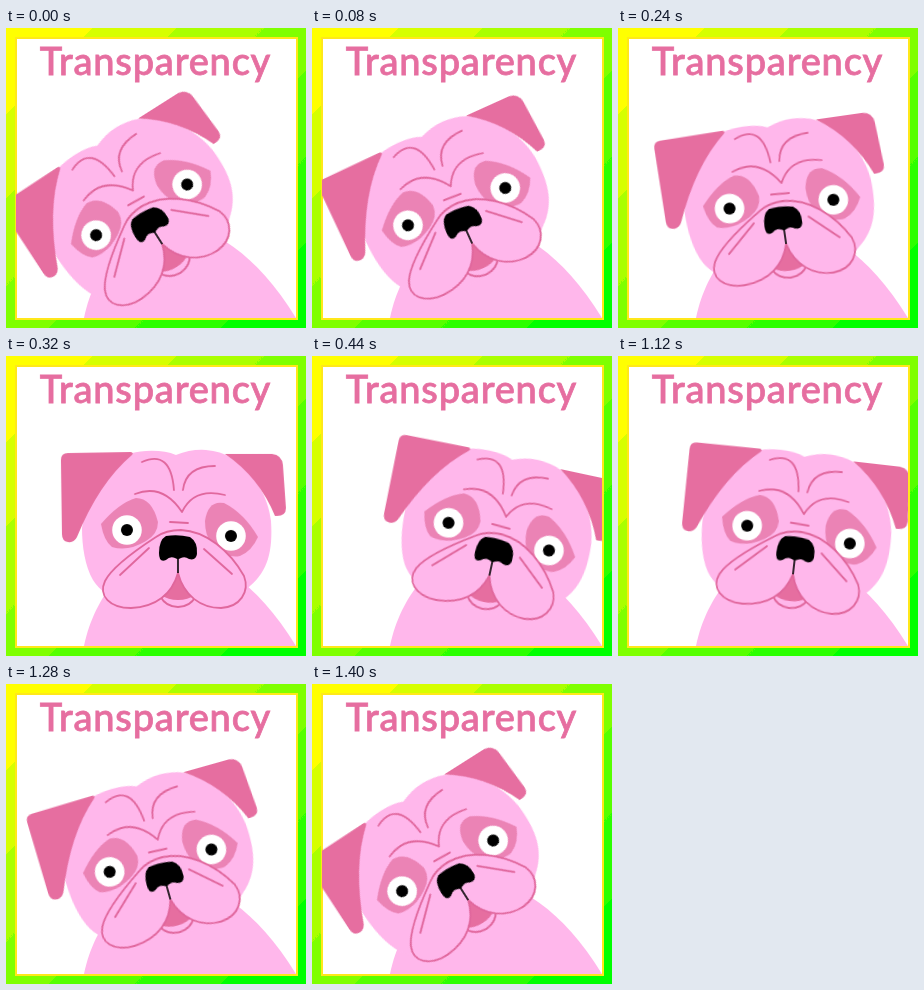
An HTML page that plays this animation: 300x300 px, repeating every 1.92 s.

```html
<!DOCTYPE html>
<html lang="en">
<head>
<meta charset="utf-8">
<title>Transparency</title>
<style>
  html, body { margin: 0; width: 100%; height: 100%; overflow: hidden; }
  svg { display: block; width: 100%; height: 100%; }
  .title { font: 500 38px Lato, sans-serif; letter-spacing: .8px; fill: #e66ea0; stroke: #e66ea0; stroke-width: .8; }
  .skin { fill: #ffb7eb; }
  .dark { fill: #e66ea0; }
  .patch { fill: #eb83b5; }
  .line { stroke: #e0669c; stroke-width: 1.8; stroke-linecap: round; stroke-linejoin: round; }
  .open { fill: none; }
  .head { transform-origin: 162.6px 243.7px; animation: tilt 1920ms infinite; }
  @keyframes tilt {
    0% { transform: rotate(-32.4deg); animation-timing-function: steps(11, end); }
    22.9167%, 56.25% { transform: rotate(12.1deg); animation-timing-function: steps(8, end); }
    72.9167%, 100% { transform: rotate(-32.4deg); }
  }
</style>
</head>
<body>
<svg viewBox="0 0 300 300">
  <defs>
    <linearGradient id="fade" x2="1" y2="1">
      <stop stop-color="#ff0"/>
      <stop offset="1" stop-color="#0f0"/>
    </linearGradient>
    <filter id="bands" x="0" y="0" width="1" height="1" color-interpolation-filters="sRGB">
      <feComponentTransfer>
        <feFuncR type="discrete" tableValues="0 .17 .34 .5 .67 .84 1"/>
      </feComponentTransfer>
    </filter>
    <clipPath id="window"><rect x="10" y="10" width="280" height="280"/></clipPath>
    <g id="eye">
      <circle r="14.8" fill="#fff"/>
      <circle r="6"/>
    </g>
  </defs>

  <rect width="300" height="300" fill="url(#fade)" filter="url(#bands)"/>
  <rect x="10" y="10" width="281" height="281" fill="#fff" stroke="#ffe81a" stroke-width="2"/>
  <text class="title" x="149.5" y="47" text-anchor="middle">Transparency</text>

  <g clip-path="url(#window)">
    <path class="skin" d="M78 290C88 240 125 195 165 195C205 197 250 225 290 290Z"/>

    <g class="head">
      <!-- skull and ears -->
      <path class="skin" d="M108 108Q118 96 140 95Q158 94 170 99Q185 93 200 94Q215 95 225 102C250 120 262 140 265 165C267 195 262 215 244 230C225 250 200 254 172 254C130 254 100 245 87 224C79 210 76 190 76 172C80 145 90 125 108 108Z"/>
      <path class="dark" d="M62 97L125 96Q128 97 126 99Q93 127 71 181Q68 187 62 186Q56 185 56 178L55 104Q55 97 62 97Z"/>
      <path class="dark" d="M219 98L266 98Q276 99 277 109L280 152Q280 161 269 160Q253 121 219 98Z"/>

      <!-- brow wrinkles -->
      <path class="line open" d="M136 106Q165 93 168 134M177 134Q180 110 209 110M129 138Q157 127 176 156Q188 131 219 139M164 166L182 167"/>

      <!-- eyes -->
      <path class="patch" d="M95 168Q113 147 130 142Q146 142 152 166Q152 178 140 185Q122 196 106 191Q98 185 95 168Z"/>
      <path class="patch" d="M252 181Q238 157 218 147Q202 144 199 165Q199 180 206 188Q220 203 234 200Q246 195 252 181Z"/>
      <use href="#eye" x="121" y="174"/>
      <use href="#eye" x="225" y="180"/>

      <!-- mouth and muzzle -->
      <path class="skin line" d="M154 240Q160 251 172 251Q184 251 190 240Z"/>
      <path class="dark" d="M172 214L155 239Q162 244 172 244Q182 244 189 239Z"/>
      <path class="skin line" d="M172 217C166 238 150 251 125 252C104 252 92 240 99 225C106 211 130 194 150 181Q160 174 175 174C200 175 224 195 238 220C244 236 234 251 215 252C195 252 178 240 172 217Z"/>
      <path class="line open" d="M143 192L114 219M198 193L226 218"/>

      <!-- nose -->
      <path d="M160 180Q172 178 184 181Q192 186 191 198Q190 205 183 203Q179 200 175 202Q172 204 169 202Q164 200 160 204Q153 207 153 197Q153 184 160 180Z"/>
      <path d="M172 201L172 217" stroke="#000" stroke-width="1.6"/>
    </g>
  </g>
</svg>
</body>
</html>
```
